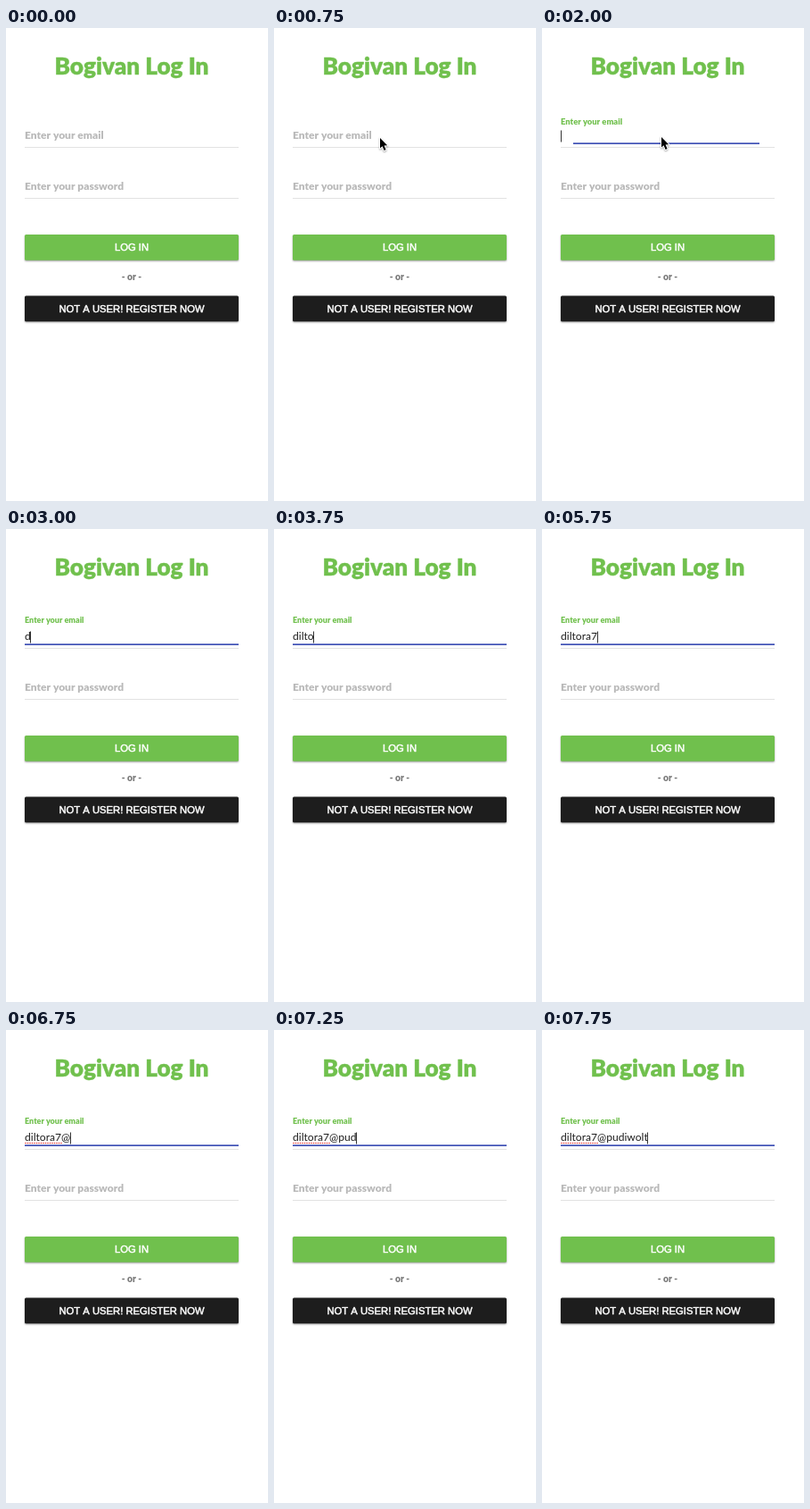
Write an HTML page with a canvas that moves like this. It is 294 by 529 pixels and loops after 8 s.

```html
<!DOCTYPE html>
<html lang="en">
<head>
<meta charset="utf-8">
<title>Log in form</title>
<style>
  html, body { margin: 0; width: 100%; height: 100%; overflow: hidden; background: #fff; }
  canvas { display: block; width: 294px; height: 529px; }
</style>
</head>
<body>
<canvas id="stage"></canvas>
<script>
const W = 294, H = 529, LOOP = 8000;
const GREEN = '#70c04d', INK = '#1d1d1d', HINT = '#b9b9b9', LINE = '#e2e2e2', FOCUS = '#3f51b5';
const LEFT = 21, WIDTH = 240, MID = 141;
const EMAIL = 'diltora7@pudiwolt';
const LOCAL = EMAIL.split('@')[0];

// [start time, value]; each value holds until the next start
const typed = [[0, 0], [3000, 1], [3250, 3], [3500, 4], [3750, 5], [4000, 7],
  [5750, 8], [6750, 9], [7000, 10], [7250, 12], [7500, 14], [7750, 17]];
const caretOn = [[0, false], [2000, true], [4750, false], [5250, true], [6250, false], [6750, true]];
const pointer = [[0, null], [500, [142.5, 115.5]], [750, [119, 123]], [2000, [134, 122]], [2250, null]];
const label = [[0, { size: 12, y: 124, color: HINT }],
  [2000, { size: 9.4, y: 108.3, color: GREEN }],
  [2250, { size: 9, y: 105, color: GREEN }]];
const underline = [[0, 0], [2000, 209], [2250, WIDTH]];

const canvas = document.getElementById('stage');
const ctx = canvas.getContext('2d');
const dpr = window.devicePixelRatio || 1;
canvas.width = W * dpr;
canvas.height = H * dpr;

const at = (steps, t) => steps.filter(([start]) => start <= t).pop()[1];
const lato = (weight, size) => `${weight} ${size}px Lato, sans-serif`;

// an outline of the given width makes the letters heavier
function text(str, x, y, font, color, align = 'left', outline = 0) {
  ctx.font = font;
  ctx.fillStyle = ctx.strokeStyle = color;
  ctx.textAlign = align;
  ctx.fillText(str, x, y);
  if (!outline) return;
  ctx.lineWidth = outline;
  ctx.lineJoin = 'round';
  ctx.strokeText(str, x, y);
}

function rect(x, y, w, h, color) {
  ctx.fillStyle = color;
  ctx.fillRect(x, y, w, h);
}

function button(str, y, h, baseline, color) {
  ctx.save();
  ctx.shadowColor = 'rgba(0,0,0,.4)';
  ctx.shadowBlur = 2 * dpr;
  ctx.shadowOffsetY = dpr;
  ctx.fillStyle = color;
  ctx.beginPath();
  ctx.roundRect(LEFT, y, WIDTH, h, 1.5);
  ctx.fill();
  ctx.restore();
  text(str, MID, baseline, '11.25px "Liberation Sans", Arial, sans-serif', '#fff', 'center', 0.5);
}

function spellingDots(width) {
  ctx.fillStyle = '#e8403a';
  for (let x = 1; x < width; x += 2.5) {
    ctx.beginPath();
    ctx.arc(LEFT + x, 126.5, 0.8, 0, Math.PI * 2);
    ctx.fill();
  }
}

function arrow([x, y]) {
  const shape = [[0, 0], [0, 11.6], [2.6, 9.2], [4.6, 14], [6.6, 13.1], [4.6, 8.4], [8.2, 8.2]];
  ctx.save();
  ctx.translate(x, y);
  ctx.beginPath();
  shape.forEach(([px, py]) => ctx.lineTo(px, py));
  ctx.closePath();
  ctx.lineJoin = 'round';
  ctx.lineWidth = 2;
  ctx.strokeStyle = '#fff';
  ctx.shadowColor = 'rgba(0,0,0,.35)';
  ctx.shadowBlur = 2 * dpr;
  ctx.shadowOffsetY = dpr;
  ctx.stroke();
  ctx.shadowColor = 'transparent';
  ctx.fillStyle = '#000';
  ctx.fill();
  ctx.restore();
}

function emailField(t) {
  const { size, y, color } = at(label, t);
  text('Enter your email', LEFT, y, lato(900, size), color);
  rect(LEFT, 133, WIDTH, 1, LINE);

  const w = at(underline, t);
  rect(w < WIDTH ? 35 : LEFT, 128.3, w, 1.7, FOCUS);

  const value = EMAIL.slice(0, at(typed, t));
  text(value, LEFT, 124, lato(400, 12.1), INK);
  const end = LEFT + ctx.measureText(value).width;
  if (value.includes('@')) spellingDots(ctx.measureText(LOCAL).width);
  if (at(caretOn, t)) rect(Math.floor(end), 114.5, 1, 13, '#333');
}

function draw(t) {
  ctx.setTransform(dpr, 0, 0, dpr, 0, 0);
  rect(0, 0, W, H, '#fff');
  text('Bogivan Log In', MID, 52, lato(900, 26.2), GREEN, 'center', 0.4);
  emailField(t);
  text('Enter your password', LEFT, 181, lato(900, 12), HINT);
  rect(LEFT, 190, WIDTH, 1, LINE);
  button('LOG IN', 231, 28.7, 249, GREEN);
  text('- or -', MID, 282, lato(900, 10.3), '#777', 'center');
  button('NOT A USER! REGISTER NOW', 299.5, 28.7, 318, INK);
  const tip = at(pointer, t);
  if (tip) arrow(tip);
}

const begin = performance.now();
function tick() {
  draw((performance.now() - begin) % LOOP);
  requestAnimationFrame(tick);
}
tick();
</script>
</body>
</html>
```
